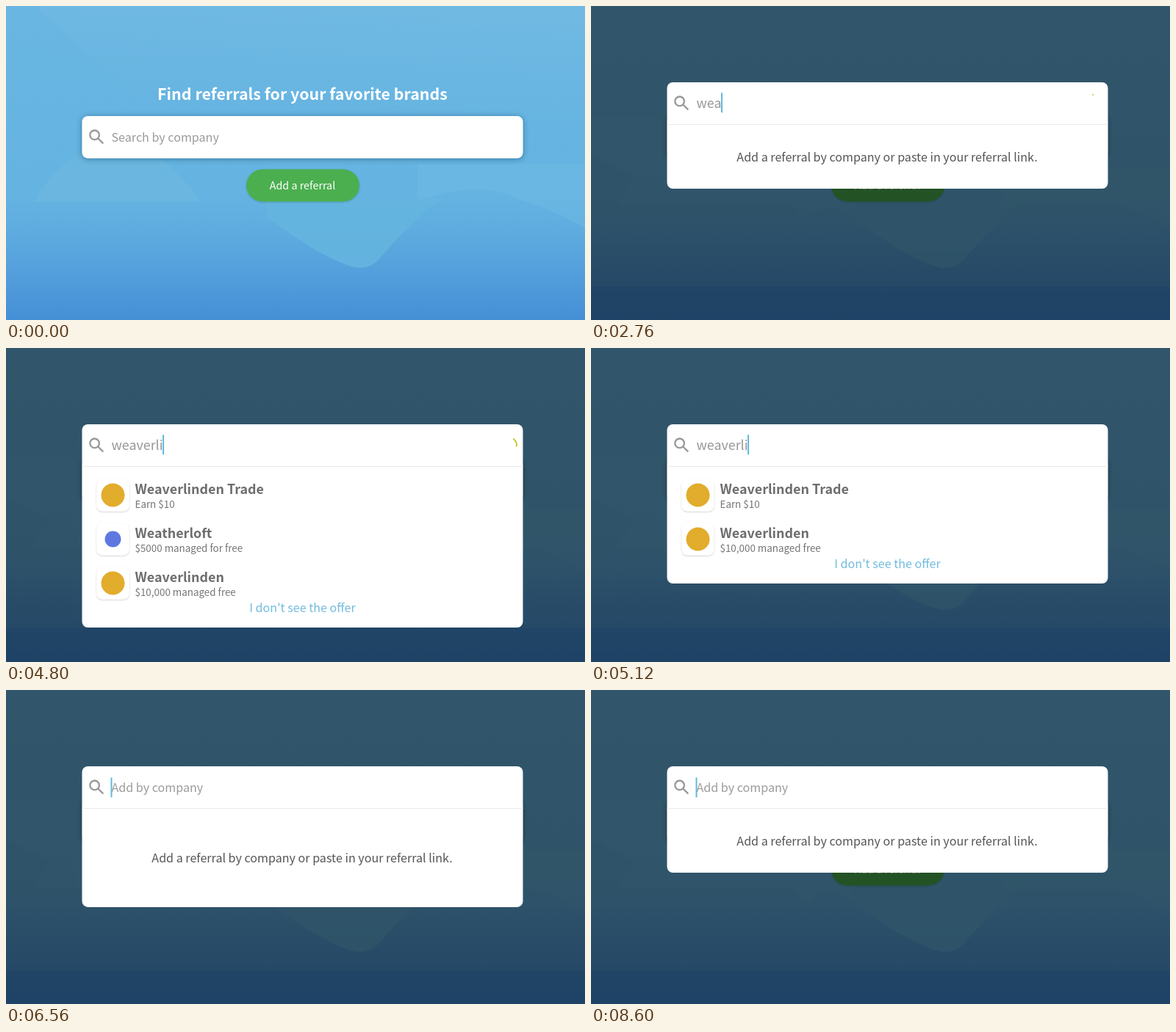
Write an HTML page that moves like this. It is 788 by 428 pixels and loops after 8.72 s.

```html
<!DOCTYPE html>
<html lang="en">
<head>
<meta charset="utf-8">
<title>Add a referral</title>
<style>
  html, body { margin: 0; width: 100%; height: 100%; overflow: hidden; background: #66b4e1; }
  svg { display: block; width: 788px; height: 428px; }
  text { font-family: "Noto Sans CJK SC", "Noto Sans CJK JP", "Noto Sans CJK", "Noto Sans", sans-serif; white-space: pre; }
  .mid { text-anchor: middle; }
  .heading { font-size: 21.4px; font-weight: 700; fill: #fff; }
  .button { font-size: 14.3px; fill: #fff; }
  .body { font-size: 16.1px; fill: #555; }
  .hint { font-size: 16.1px; fill: #9b9b9b; }
  .typed { font-size: 17.9px; fill: #979797; }
  .name { font-size: 17.9px; font-weight: 700; fill: #6d6d6d; }
  .offer { font-size: 13.4px; fill: #747474; }
  .link { font-size: 16.1px; fill: #72bbde; }
</style>
</head>
<body>
<svg viewBox="0 0 788 428" xmlns="http://www.w3.org/2000/svg">
  <defs>
    <linearGradient id="sky" x2="0" y2="1">
      <stop offset="0" stop-color="#69b6e2"/>
      <stop offset=".6" stop-color="#64b3e1"/>
      <stop offset=".69" stop-color="#60aee0"/>
      <stop offset=".82" stop-color="#56a2dd"/>
      <stop offset="1" stop-color="#458fd6"/>
    </linearGradient>
    <linearGradient id="glow" x1=".35" y1=".6" x2=".5" y2="0">
      <stop offset="0" stop-color="#fff" stop-opacity="0"/>
      <stop offset="1" stop-color="#fff" stop-opacity=".04"/>
    </linearGradient>
    <filter id="shadow" x="-10%" y="-40%" width="120%" height="180%">
      <feDropShadow dx="0" dy="1" stdDeviation="3.5" flood-color="#02304f" flood-opacity=".5"/>
    </filter>
    <filter id="soft" x="-20%" y="-20%" width="140%" height="140%">
      <feDropShadow dx="0" dy="1" stdDeviation="1" flood-opacity=".2"/>
    </filter>
    <clipPath id="buttonClip"><rect x="327" y="222.5" width="154" height="44" rx="22"/></clipPath>
    <clipPath id="panelClip"><rect id="panelClipRect" x="103.5" y="104" width="600" rx="8"/></clipPath>
    <g id="lens" fill="none" stroke="#999" stroke-width="2.3">
      <circle cx="120.6" cy="129.8" r="6.3"/>
      <path d="M125 134.2l7.3 7.2"/>
    </g>
  </defs>

  <rect width="788" height="428" fill="url(#sky)"/>
  <g id="lightHills">
    <path d="M40 0H788V240H300Z" fill="url(#glow)"/>
    <path d="M38 267C55 238 75 214 106 199C150 180 205 195 226 222Q250 244 265 267Z" fill="#70bae0" opacity=".55"/>
    <path d="M560 267Q640 235 700 264Q745 278 788 303V215H560Z" fill="#70bbe3" opacity=".4"/>
  </g>
  <g id="dimHills" fill="#6bb8e2">
    <path d="M0 203L60 234L35 271H275L293 293L305 281Q325 268 355 286V150H0Z" opacity=".45"/>
    <path d="M560 272H720Q750 282 788 302V220H560Z" opacity=".5"/>
    <path d="M0 382H788V428H0Z" fill="#3c8edb" opacity=".5"/>
  </g>
  <path d="M355 288C395 316 430 342 470 355Q490 361 505 348C530 320 548 300 580 272L600 262H355Z" fill="#66b6e0" opacity=".85"/>

  <text class="heading mid" x="403.5" y="128">Find referrals for your favorite brands</text>
  <rect x="103.5" y="150" width="600" height="57.5" rx="8" fill="#fff" filter="url(#shadow)"/>
  <use href="#lens" y="46"/>
  <text class="hint" x="143.5" y="185">Search by company</text>
  <g filter="url(#soft)">
    <rect id="button" x="327" y="222.5" width="154" height="44" rx="22"/>
  </g>
  <circle id="ripple" cx="391" cy="245" r="66" fill="#388e3c" clip-path="url(#buttonClip)"/>
  <text class="button mid" x="403.5" y="250">Add a referral</text>

  <rect id="shade" width="788" height="428"/>

  <g id="modal">
    <rect id="panel" x="103.5" y="104" width="600" rx="8" fill="#fff"/>
    <use href="#lens"/>
    <path d="M103.5 161.5h600" stroke="#ebebeb"/>
    <text class="hint" id="hint" x="143.5" y="139">Add by company</text>
    <text class="typed" id="typed" x="143.5" y="139.3"></text>
    <rect id="caret" width="2" height="27" fill="#62b8dd"/>
    <circle id="spinner" cx="683" cy="133" r="12" fill="none" stroke="#c6c535" stroke-width="2" pathLength="100"/>
    <g clip-path="url(#panelClip)">
      <text class="body mid" id="message" x="403">Add a referral by company or paste in your referral link.</text>
      <g id="results"></g>
      <text class="link mid" id="link" x="403.5">I don't see the offer</text>
    </g>
  </g>
</svg>
<script>
const LOOP = 8720, STEP = 40;
const $ = id => document.getElementById(id);
const set = (id, attrs) => {
  for (const key in attrs) $(id).setAttribute(key, attrs[key]);
};
const show = (id, on) => set(id, { visibility: on ? "visible" : "hidden" });
const clamp = v => Math.min(1, Math.max(0, v));
const easeOut = p => 1 - Math.pow(1 - clamp(p), 1.85);

const gold = '<circle cx="145.5" cy="200.5" r="16" fill="#e2ac2c"/>';
const blue = '<circle cx="145.5" cy="200.5" r="11" fill="#5f78e0"/>';
const offers = [
  ["Weaverlinden Trade", "Earn $10", gold],
  ["Weatherloft", "$5000 managed for free", blue],
  ["Weaverlinden", "$10,000 managed free", gold]
];
$("results").innerHTML = offers.map(([name, offer, mark], i) => `<g id="row${i}">
  <rect x="123.5" y="178.5" width="44" height="44" rx="8" fill="#fff" filter="url(#soft)"/>${mark}
  <text class="name" x="175.5" y="198.5">${name}</text>
  <text class="offer" x="175.5" y="218.3">${offer}</text></g>`).join("");

// Each key press: time and the text it leaves in the field.
const query = "weaverli";
const presses = [[0, 0], [2320, 1], [2480, 2], [2760, 3], [4000, 4], [4160, 5], [4320, 6], [4480, 7], [4720, 8],
  [5360, 7], [5440, 6], [5520, 5], [5600, 4], [5680, 3], [5760, 2], [5840, 1], [6160, 0]];

// Panel changes: start, end, new bottom edge, visible rows.
const resizes = [[3160, 3400, 381, 3], [4920, 5120, 321, 2], [5680, 5880, 381, 3], [6440, 6720, 249, 0]];

const searches = [[2760, 3160], [4720, 4920], [5360, 5680]];

// Caret opacity, linear between points.
const blink = [[1359, 0], [1360, 1], [1940, 1], [2120, 0], [2319, 0], [2320, 1], [3620, 1], [3840, 0], [3999, 0], [4000, 1],
  [7040, 1], [7200, 0], [7520, 0], [7720, 1], [7960, 1], [8120, 0], [8440, 0], [8600, 1]];

function along(points, t) {
  const next = points.findIndex(p => p[0] > t);
  if (next < 0) return points[points.length - 1][1];
  if (next === 0) return points[0][1];
  const [t0, v0] = points[next - 1], [t1, v1] = points[next];
  return v0 + (v1 - v0) * (t - t0) / (t1 - t0);
}

function panelAt(t) {
  let bottom = 249, rows = 0;
  for (const [start, end, to, count] of resizes) {
    if (t < start) break;
    bottom += (to - bottom) * easeOut((t - start) / (end - start));
    rows = count;
  }
  return { bottom, rows };
}

function drawPage(t) {
  const dim = t < 880 ? 0 : t < 920 ? 0.4 : t < 1360 ? 0.85 : 1;
  const hover = t < 1360 ? clamp((t - 40) / 240) : 0;
  const mix = (a, b) => Math.round(a + (b - a) * hover);
  set("button", { fill: `rgb(${mix(76, 66)},${mix(175, 152)},${mix(80, 69)})` });
  show("ripple", t >= 880 && t < 1600);
  set("lightHills", { opacity: 1 - dim });
  set("dimHills", { opacity: dim });
  set("shade", { opacity: 0.53 * dim });
  set("modal", { opacity: dim });
}

function drawField(t) {
  const length = presses.filter(p => p[0] <= t).pop()[1];
  $("typed").textContent = query.slice(0, length);
  show("hint", length === 0);
  const x = length ? 143 + $("typed").getComputedTextLength() : 142.5;
  set("caret", { x, y: length ? 118.3 : 119.3, opacity: along(blink, t) });

  const search = searches.find(([start, end]) => t >= start && t < end);
  show("spinner", search);
  if (search) {
    const p = (t - search[0]) / 400;
    set("spinner", {
      "stroke-dasharray": `${2 + 70 * p} 100`,
      transform: `rotate(${-92 + 200 * p} 683 133)`
    });
  }
}

function drawPanel(t) {
  const { bottom, rows } = panelAt(t);
  set("panel", { height: bottom - 104 });
  set("panelClipRect", { height: bottom - 104 });
  set("message", { y: (161.5 + bottom) / 2 + 6.5 });
  show("message", rows === 0);
  show("link", rows > 0);
  set("link", { y: 180 + rows * 60 });
  offers.forEach((_, i) => {
    const hidden = rows === 0 || (rows === 2 && i === 1);
    const place = rows === 2 && i === 2 ? 1 : i;
    show("row" + i, !hidden);
    set("row" + i, { transform: `translate(0 ${place * 60})` });
  });
}

const origin = performance.now();
function frame(now) {
  const elapsed = Math.max(0, now - origin) % LOOP;
  const t = Math.floor(elapsed / STEP) * STEP;
  drawPage(t);
  drawField(t);
  drawPanel(t);
  requestAnimationFrame(frame);
}
frame(origin);
</script>
</body>
</html>
```
